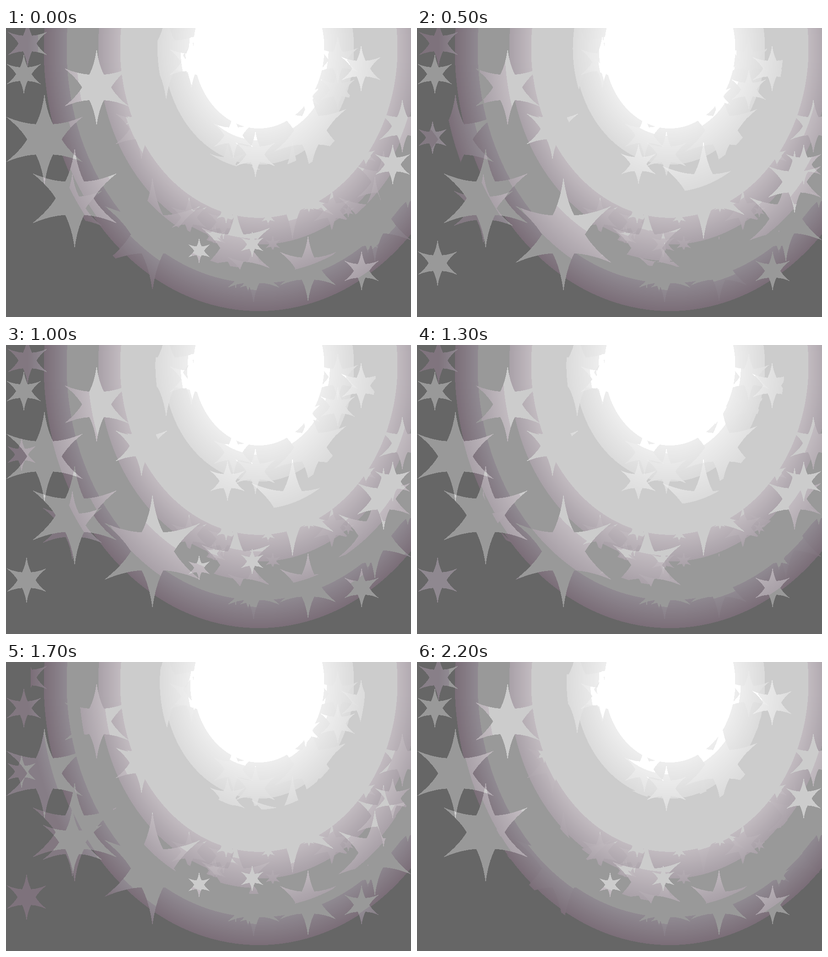
Recreate the animation shown at these times as an HTML page with a canvas. Size 885 px wide and 633 px high, loop 2400 ms.

```html
<!DOCTYPE html>
<html lang="en">
<head>
<meta charset="utf-8">
<title>Twinkling stars</title>
<style>
html, body { margin: 0; width: 100%; height: 100%; overflow: hidden; background: #666; }
canvas { display: block; width: 100vw; height: 100vh; }
</style>
</head>
<body>
<canvas id="stage" width="885" height="633"></canvas>
<script>
const W = 885, H = 633, LOOP = 2400, STEP = 100, TICKS = LOOP / STEP;
const ctx = document.getElementById('stage').getContext('2d');
const image = ctx.createImageData(W, H);
const pixels = new Uint32Array(image.data.buffer);

// The glow: light falls by one per pixel of elliptical radius until it reaches zero.
const GLOW = { x: 552.5, y: 45, reach: 505, ratio: 1.2235 };
const base = Float32Array.from({ length: W * H }, (_, i) => {
  const dx = i % W + .5 - GLOW.x;
  const dy = (Math.floor(i / W) + .5 - GLOW.y) / GLOW.ratio;
  return Math.max(0, GLOW.reach - Math.hypot(dx, dy));
});

// Light is shown in flat tones, each 0x33 apart, with a graded band between them.
const rings = { rim: 470, mid: 420, veil: 351, pale: 303, halo: 208, core: 143 };
const pack = ([r, g, b]) => (255 << 24 | b << 16 | g << 8 | r) >>> 0;
const grey = v => [v, v, v];
const tones = new Uint32Array(GLOW.reach + 1).fill(pack(grey(102)));

function tone(outer, inner, from, to = from) {
  for (let r = outer; r > inner; r--) {
    const p = (outer - r) / (outer - inner);
    tones[GLOW.reach - r] = pack(from.map((c, k) => Math.round(c + (to[k] - c) * p)));
  }
}
tone(rings.rim, rings.mid, [123, 110, 120], [144, 138, 146]);
tone(rings.mid, rings.veil, grey(153));
tone(rings.veil, rings.pale, [169, 161, 168], [194, 187, 192]);
tone(rings.pale, rings.halo, grey(204));
tone(rings.halo, rings.core, grey(219), grey(238));
tone(rings.core, -1, grey(255));

const scratch = document.createElement('canvas');
const pen = scratch.getContext('2d', { willReadFrequently: true });

// Six curved points; returns the covered cells of a square around the star.
function starMask(R) {
  const size = scratch.width = scratch.height = 2 * R + 2, c = size / 2;
  const at = (radius, deg) => {
    const a = deg * Math.PI / 180;
    return [c + Math.cos(a) * radius * R * .975, c + Math.sin(a) * radius * R];
  };
  pen.beginPath();
  pen.moveTo(...at(1, -90));
  for (let a = -90; a < 270; a += 60) {
    pen.quadraticCurveTo(...at(.6, a + 5), ...at(.385, a + 30));
    pen.quadraticCurveTo(...at(.6, a + 55), ...at(1, a + 60));
  }
  pen.fill();
  const data = pen.getImageData(0, 0, size, size).data;
  return { size, inside: Uint8Array.from({ length: size * size }, (_, i) => data[4 * i + 3] > 110) };
}

// A smooth, cyclic loss of light around one tick.
const dip = (at, depth, width = 4) => tick => {
  const d = Math.abs(tick - at), near = Math.min(d, TICKS - d);
  return near < width ? depth * (.5 + .5 * Math.cos(Math.PI * near / width)) : 0;
};

const groups = [];
function group(power, dips, ...list) {
  const stars = list.map(([x, y, R]) => ({ left: x - R - 1, top: y - R - 1, ...starMask(R) }));
  const light = tick => power * Math.max(0, dips.reduce((v, f) => v - f(tick), 1));
  groups.push({ stars, light });
}

const twice = [dip(7.3, .78), dip(18.5, .84)];
group(.245, twice, [39, 101, 45], [150, 373, 110], [845, 299, 46], [777, 532, 45]);
group(.11, twice, [502, 482, 90], [665, 224, 94], [405, 75, 58]);

const middle = [dip(7.3, .88), dip(15.4, .85)];
group(.24, middle, [198, 130, 84], [776, 89, 52]);
group(.13, middle, [47, 34, 52], [545, 277, 52], [497, 235, 52], [866, 215, 60]);

const spread = [dip(3.6, .9, 5.5), dip(18.5, .75)];
group(.255, spread, [84, 244, 100]);
group(.08, spread, [725, 70, 53], [350, 60, 98]);

const early = [dip(5, .85), dip(13, .85)];
group(.23, early, [422, 488, 29], [538, 474, 30]);
group(.13, early, [660, 527, 73]);

group(.11, [dip(13, .9), dip(22.4, 1)],
  [34, 240, 38], [145, 395, 77], [806, 418, 95], [725, 135, 45], [655, 150, 38]);
group(.19, [dip(17, .55, 6), dip(22.8, 1)],
  [45, 515, 52], [320, 452, 125], [626, 356, 108], [484, 298, 46], [825, 337, 70], [296, 221, 68]);

// Steady faint stars, some of them small chips scattered along the ring edges.
let seed = 11;
const random = () => (seed = seed * 16807 % 2147483647) / 2147483647;
const chips = Array.from({ length: 16 }, (_, i) => {
  const r = [rings.mid, rings.veil, rings.pale][i % 3], a = Math.PI * random();
  return [
    Math.round(GLOW.x + r * Math.cos(a)),
    Math.round(GLOW.y + r * Math.sin(a) * GLOW.ratio),
    Math.round(14 + 16 * random())
  ];
});
group(.028, [], [541, 535, 68], [712, 400, 48], [400, 415, 46], [475, 425, 40], ...chips);

const field = new Float32Array(W * H);

// Each star lifts the light below it part of the way to full white.
function lift({ left, top, size, inside }, amount) {
  const x0 = Math.max(0, left), x1 = Math.min(W, left + size);
  const y0 = Math.max(0, top), y1 = Math.min(H, top + size);
  for (let y = y0; y < y1; y++) {
    const row = (y - top) * size - left;
    for (let x = x0; x < x1; x++) {
      if (inside[row + x]) field[y * W + x] += amount * (GLOW.reach - field[y * W + x]);
    }
  }
}

function draw(tick) {
  field.set(base);
  for (const { stars, light } of groups) {
    const amount = light(tick);
    for (const star of stars) lift(star, amount);
  }
  for (let i = 0; i < field.length; i++) pixels[i] = tones[field[i] | 0];
  ctx.putImageData(image, 0, 0);
}

const holds = new Set([4, 12, 23]);
const start = performance.now();
let shown = -1;

function frame() {
  let tick = Math.floor((performance.now() - start) % LOOP / STEP);
  if (holds.has(tick)) tick--;
  if (tick !== shown) draw(shown = tick);
  requestAnimationFrame(frame);
}
frame();
</script>
</body>
</html>
```
